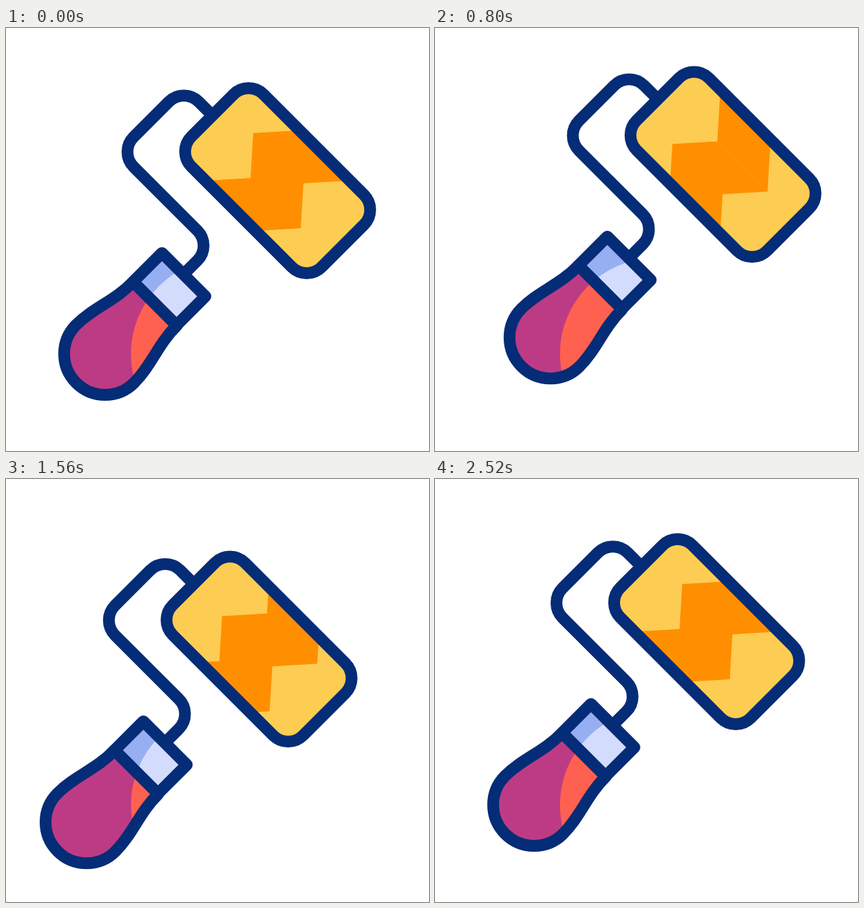
These frames come from a looping animation (640 by 640 pixels, 2800 ms). An HTML page with a canvas:

```html
<!DOCTYPE html>
<html lang="en">
<head>
<meta charset="utf-8">
<title>Paint roller</title>
<style>
  html, body { margin: 0; width: 100%; height: 100%; overflow: hidden; background: #fff; }
  canvas { display: block; width: 640px; height: 640px; }
</style>
</head>
<body>
<canvas id="stage" width="640" height="640"></canvas>
<script>
const ctx = document.getElementById('stage').getContext('2d');
const LOOP = 2800, STEP = 40;
const NAVY = '#052c76', YELLOW = '#fdcc52', ORANGE = '#ff8f00', SEAM = '#ff9a14',
      PLUM = '#bd3b84', CORAL = '#ff6150', BLUE = '#96aff2', PALE = '#d3dcfc';

// Eased timing curve with flat ends and control abscissas x1, x2.
function ease(x1, x2) {
  return x => {
    let lo = 0, hi = 1;
    for (let i = 0; i < 30; i++) {
      const s = (lo + hi) / 2, r = 1 - s;
      if (3 * x1 * s * r * r + 3 * x2 * s * s * r + s ** 3 < x) lo = s; else hi = s;
    }
    return lo * lo * (3 - 2 * lo);
  };
}

const smooth = ease(1 / 3, 2 / 3);
const settle = ease(0.14, 0.28);

// tool: offset of the whole roller; print: offset of the zigzag on it.
const KEYS = [
  { at: 0, tool: [0, 0], print: [0, 0], curve: smooth },
  { at: 590, tool: [36, -35.5], print: [-59.5, 60.5], curve: smooth },
  { at: 1420, tool: [-34.5, 32.3], print: [65, -61], curve: settle },
  { at: 2520, tool: [0, 0], print: [0, 0] }
];

function poseAt(time) {
  const i = KEYS.findIndex((key, n) => n > 0 && time < key.at);
  if (i < 0) return KEYS[KEYS.length - 1];
  const a = KEYS[i - 1], b = KEYS[i];
  const p = a.curve((time - a.at) / (b.at - a.at));
  const mix = name => a[name].map((v, n) => v + (b[name][n] - v) * p);
  return { tool: mix('tool'), print: mix('print') };
}

function polygon(points) {
  const path = new Path2D();
  points.forEach(([x, y]) => path.lineTo(x, y));
  path.closePath();
  return path;
}

function makeRoller() {
  const path = new Path2D(), r = 32;
  const d = r * Math.SQRT1_2;
  path.moveTo(367 + d, 123 - d);
  path.arc(519, 275, r, -Math.PI / 4, Math.PI / 4);
  path.arc(455, 339, r, Math.PI / 4, Math.PI * 3 / 4);
  path.arc(303, 187, r, Math.PI * 3 / 4, Math.PI * 5 / 4);
  path.arc(367, 123, r, Math.PI * 5 / 4, Math.PI * 7 / 4);
  path.closePath();
  return path;
}

function makeWire() {
  const path = new Path2D();
  path.moveTo(311, 131);
  path.arcTo(269, 89, 170.5, 187.5, 32);
  path.arcTo(170.5, 187.5, 312.2, 329.2, 32);
  path.arcTo(312.2, 329.2, 268, 373.4, 32);
  path.lineTo(268, 373.4);
  return path;
}

function makeHandle() {
  const path = new Path2D();
  path.moveTo(192.3, 384);
  path.lineTo(258.5, 450.2);
  path.bezierCurveTo(230, 478, 220, 511, 193.8, 536.8);
  path.arc(150, 493, 62, Math.PI / 4, Math.PI * 5 / 4);
  path.bezierCurveTo(132, 423, 165, 413, 192.3, 384);
  path.closePath();
  return path;
}

function makeZigzag() {
  const edge = [];
  for (let k = -4; k <= 4; k++) {
    edge.push([374 - 72 * k, 159 + 72 * k], [370 - 72 * k, 227 + 72 * k]);
  }
  return polygon([...edge, ...edge.map(([x, y]) => [x + 76, y + 76]).reverse()]);
}

const roller = makeRoller(), wire = makeWire(), handle = makeHandle(), zigzag = makeZigzag();
const ferrule = polygon([[236, 340.3], [301.7, 406], [258, 449.7], [192.3, 384]]);
const light = new Path2D();
light.arc(334, 493, 145, 0, Math.PI * 2);

function fillWithin(shape, base, accent, inner, [dx, dy]) {
  ctx.fillStyle = base;
  ctx.fill(shape);
  ctx.save();
  ctx.clip(shape);
  ctx.translate(dx, dy);
  ctx.fillStyle = accent;
  ctx.fill(inner);
  if (inner === zigzag) {
    ctx.strokeStyle = SEAM;
    ctx.lineWidth = 0.8;
    ctx.beginPath();
    ctx.moveTo(442, 155);
    ctx.lineTo(518, 231);
    ctx.stroke();
  }
  ctx.restore();
}

function draw(time) {
  const { tool, print } = poseAt(time);
  const still = tool.map(v => -v);  // the light stays put while the tool moves
  ctx.fillStyle = '#fff';
  ctx.fillRect(0, 0, 640, 640);
  ctx.save();
  ctx.translate(...tool);
  fillWithin(roller, YELLOW, ORANGE, zigzag, print);
  fillWithin(handle, PLUM, CORAL, light, still);
  fillWithin(ferrule, BLUE, PALE, light, still);
  ctx.strokeStyle = NAVY;
  ctx.lineWidth = 17.8;
  ctx.lineJoin = 'round';
  for (const line of [wire, roller, handle, ferrule]) ctx.stroke(line);
  ctx.restore();
}

function tick() {
  const time = performance.now() % LOOP;
  draw(Math.floor(time / STEP) * STEP);
  requestAnimationFrame(tick);
}
tick();
</script>
</body>
</html>
```
